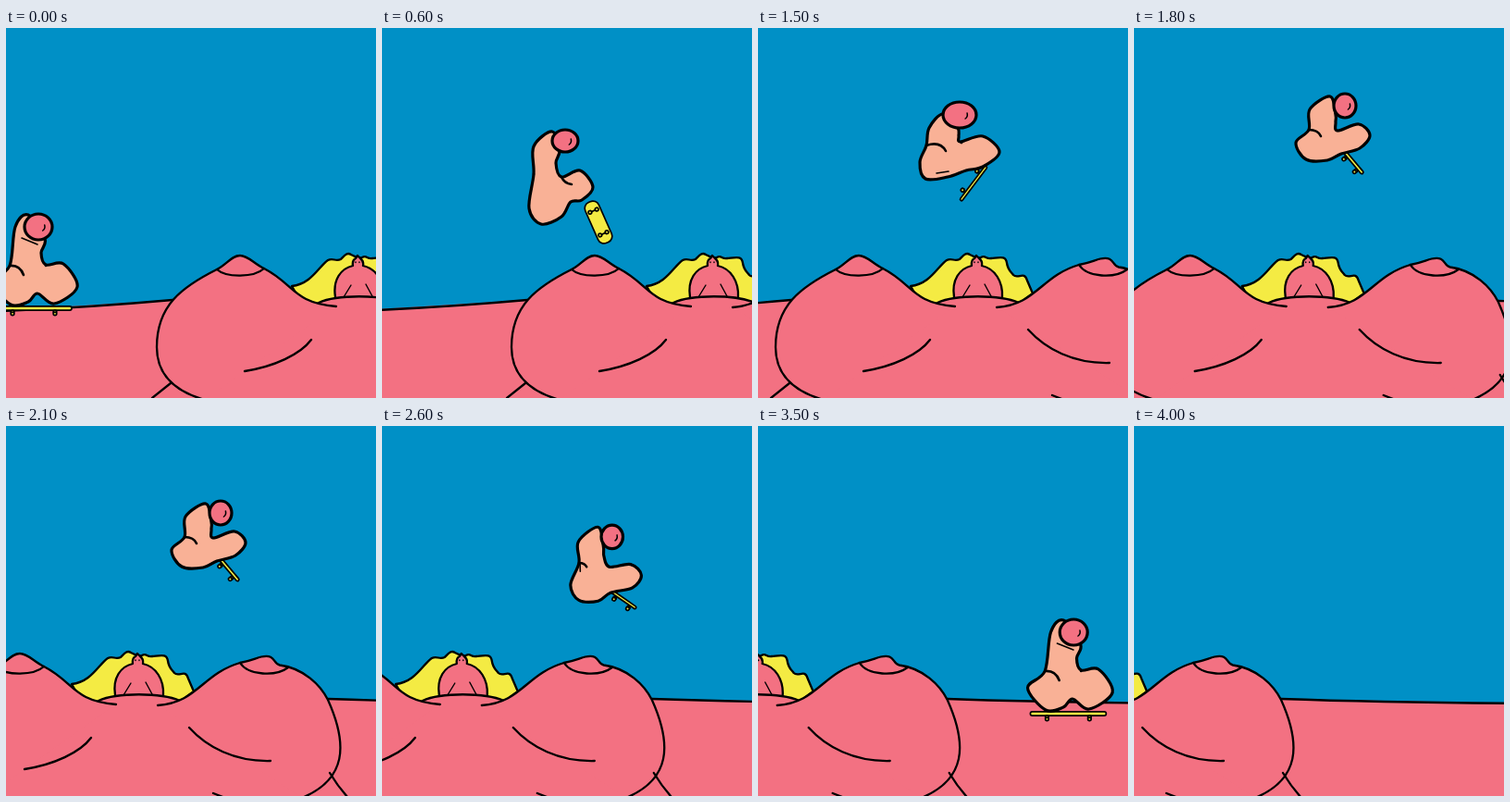
These frames come from a looping animation (400 by 400 pixels, 4.1 s). An HTML page:

```html
<!DOCTYPE html>
<html>
<head>
<meta charset="utf-8">
<style>
html, body { margin: 0; height: 100%; overflow: hidden; background: #0090c6; }
svg { display: block; width: 400px; height: 400px; }
path, ellipse, rect, circle { stroke: #000; stroke-linecap: round; stroke-linejoin: round; }
.pink { fill: #f37182; }
.yellow { fill: #f4eb43; }
.skin { fill: #f9b196; }
.line { fill: none; }
.flat { stroke: none; }
#scene { stroke-width: 2.3; }
#rider { stroke-width: 3.2; }
</style>
</head>
<body>
<svg viewBox="0 0 400 400">
  <g id="scene">
    <path class="pink flat" d="M-30 307L180 294L586 295L860 300V410H-30Z"/>
    <path class="line" d="M-30 307Q80 303 180 294M586 295Q700 299 860 300"/>
    <path class="yellow" d="M309 279C330 277 338 258 348 251C354 248 356 253 362 250C366 246 369 242 373 245C378 247 380 250 385 248C390 245 390 250 396 249C406 248 412 246 413 254C414 262 418 264 420 267C425 272 432 262 435 273L441 287L426 298H320Z"/>
    <path class="pink" d="M356 291C353 272 362 260 375 257Q374 251 378 249L380 246L383 249Q387 252 386 257C400 260 409 274 408 291"/>
    <path class="line" stroke-width="1.4" d="M365 291L373 278M396 290L389 277M378 253v.5M382 253v.5"/>
    <path class="pink flat" d="M338 297H426V312H338Z"/>
    <path class="pink" d="M338 297C358 288 405 288 426 297"/>
    <path class="pink" d="M215 402C190 395 163 380 163 345C163 300 190 280 228 261C238 256 244 246 253 246C262 246 268 255 279 260C312 277 310 297 357 301"/>
    <path class="pink" d="M402 302C445 299 450 268 491 256C502 254 508 251 514 249.5C530 246 526 257 534 258.5C560 262 578 280 586 296C608 345 606 382 558 402"/>
    <path class="line" d="M228 261C238 270 268 270 279 260M491 256C500 270 530 271 543 261M258 371C290 366 318 353 330 337M436 326C455 347 485 363 524 362M158 400L178 384M588 375Q597 390 608 402M462 397L480 404"/>
  </g>
  <g id="rider"></g>
</svg>
<script>
const LOOP = 4100, STEP = 100, POINTS = 42;
const scene = document.getElementById('scene'), rider = document.getElementById('rider');

// Each pose: 13 outline points, two creases, a mark, tip and board centres,
// then tip radii and the board's length, angle and roll.
const parse = text => text.trim().split(/[\s,]+/).map(Number);
const roll = parse(`24,202 10,215 4,257 -14,275 5,299 24,296 34,287 52,298 77,280 62,255 43,256 38,243 42,228
  15,256 19,267 43,257 43,257 17,227 34,234 35,215 30,303 15 14 82 0 15`);
const pop = parse(`184,112 164,128 164,158 159,195 172,212 194,204 204,188 216,186 228,172 214,154 194,161 188,146 192,132
  164,158 164,158 197,168 205,169 164,158 164,158 198,122 234,210 14 12 48 66 90`);
const flip = parse(`194,115 179,130 181,158 170,175 176,192 194,184 210,170 242,167 257,154 236,137 207,148 201,142 203,133
  182,160 185,163 204,157 213,157 181,158 181,158 210,123 234,178 12 13 56 167 270`);
const rise = parse(`200,93 185,108 182,127 175,145 181,163 205,161 225,154 243,150 261,134 243,117 219,123 217,117 216,108
  197,122 203,133 220,124 220,124 193,157 206,155 218,94 233,168 18 14 46 127 362`);
const float = parse(`216,84 194,98 193,120 179,134 190,152 213,153 228,146 248,140 259,126 247,114 224,121 222,112 222,104
  203,120 206,127 224,121 224,121 193,120 193,120 232,94 241,155 12 13 32 50 372`);
const drop = parse(`256,161 237,180 240,207 239,250 246,264 262,264 272,251 302,249 311,236 300,223 277,217 264,200 263,184
  240,207 240,207 277,217 277,217 245,204 248,230 269,173 286,257 11 12 42 -18 360`);
const land = [...roll.slice(0, -1), 375];

const shift = (pose, dx, dy) => pose.map((v, i) => i < POINTS ? v + (i % 2 ? dy : dx) : v);
const poses = [
  [0, roll], [300, shift(roll, 76, -1)], [600, pop], [1000, flip], [1500, rise],
  [1800, shift(float, -4, -10)], [2100, float], [2400, shift(float, 9, 5)], [3000, drop],
  [3300, shift(land, 270, 8)], [3600, shift(land, 332, 8)], [4000, shift(land, 480, 8)]
];
const camera = [[0, [0]], [400, [0]], [600, [-23]], [1000, [-80]], [1500, [-144]],
  [2100, [-238]], [3000, [-334]], [4000, [-427]]];

// Cubic interpolation that stays flat next to level stretches.
function sample(keys, t) {
  const k = Math.max(0, keys.findLastIndex((key, i) => key[0] <= t && i < keys.length - 1));
  const span = keys[k + 1][0] - keys[k][0], u = (t - keys[k][0]) / span;
  const slope = (n, i) => {
    const a = keys[Math.max(n - 1, 0)], b = keys[n], c = keys[Math.min(n + 1, keys.length - 1)];
    if (a !== b && Math.abs(b[1][i] - a[1][i]) < 2 || b !== c && Math.abs(c[1][i] - b[1][i]) < 2) return 0;
    return (c[1][i] - a[1][i]) / (c[0] - a[0]) * span;
  };
  return keys[k][1].map((p, i) => {
    const d = keys[k + 1][1][i] - p, m = slope(k, i), n = slope(k + 1, i);
    return p + u * (m + u * (3 * d - 2 * m - n + u * (m + n - 2 * d)));
  });
}

function blob(p) {
  const n = p.length, at = i => p[(i + n) % n];
  return 'M' + p[0] + p.map((a, i) => {
    const o = at(i - 1), b = at(i + 1), c = at(i + 2);
    const c1 = a.map((v, j) => v + (b[j] - o[j]) / 6), c2 = b.map((v, j) => v - (c[j] - a[j]) / 6);
    return `C${c1} ${c2} ${b}`;
  }).join('') + 'Z';
}

function board([x, y], len, angle, turn) {
  const s = Math.sin(turn * Math.PI / 180), c = Math.cos(turn * Math.PI / 180);
  const h = Math.max(3, 16 * Math.abs(s));
  const deck = `<rect class="yellow" x="${-len / 2}" y="${-h / 2}" width="${len}" height="${h}" rx="${Math.min(h / 2, 7)}"/>`;
  const wheels = [-1, 1].map(e => {
    const ys = [-4 * s + 5 * c, 4 * s + 5 * c], wx = e * len * .28;
    return `<path class="line" d="M${wx} ${ys[0]}V${ys[1]}"/>` +
      ys.map(wy => `<circle class="yellow" cx="${wx}" cy="${wy}" r="1.8"/>`).join('');
  }).join('');
  return `<g stroke-width="1.7" transform="translate(${x} ${y}) rotate(${angle})">${s > 0 ? deck + wheels : wheels + deck}</g>`;
}

function draw(t) {
  scene.setAttribute('transform', `translate(${sample(camera, t)[0]})`);
  const v = sample(poses, t), p = [];
  for (let i = 0; i < POINTS; i += 2) p.push([v[i], v[i + 1]]);
  const [rx, ry, len, angle, turn] = v.slice(POINTS), tip = p[19];
  rider.innerHTML = board(p[20], len, angle, turn) +
    `<path class="skin" d="${blob(p.slice(0, 13))}"/>
    <path class="line" stroke-width="2.6" d="M${p[2]}Q${p[13]} ${p[14]}M${p[10]}Q${p[15]} ${p[16]}"/>
    <path class="line" stroke-width="1.6" d="M${p[17]}L${p[18]}"/>
    <ellipse class="pink" cx="${tip[0]}" cy="${tip[1]}" rx="${rx}" ry="${ry}"/>
    <path class="line" stroke-width="1.5" d="M${tip[0] + rx * .45} ${tip[1] - 2}q1 4 -2 6"/>`;
}

function tick() {
  draw(Math.floor(performance.now() % LOOP / STEP) * STEP);
  requestAnimationFrame(tick);
}
tick();
</script>
</body>
</html>
```
